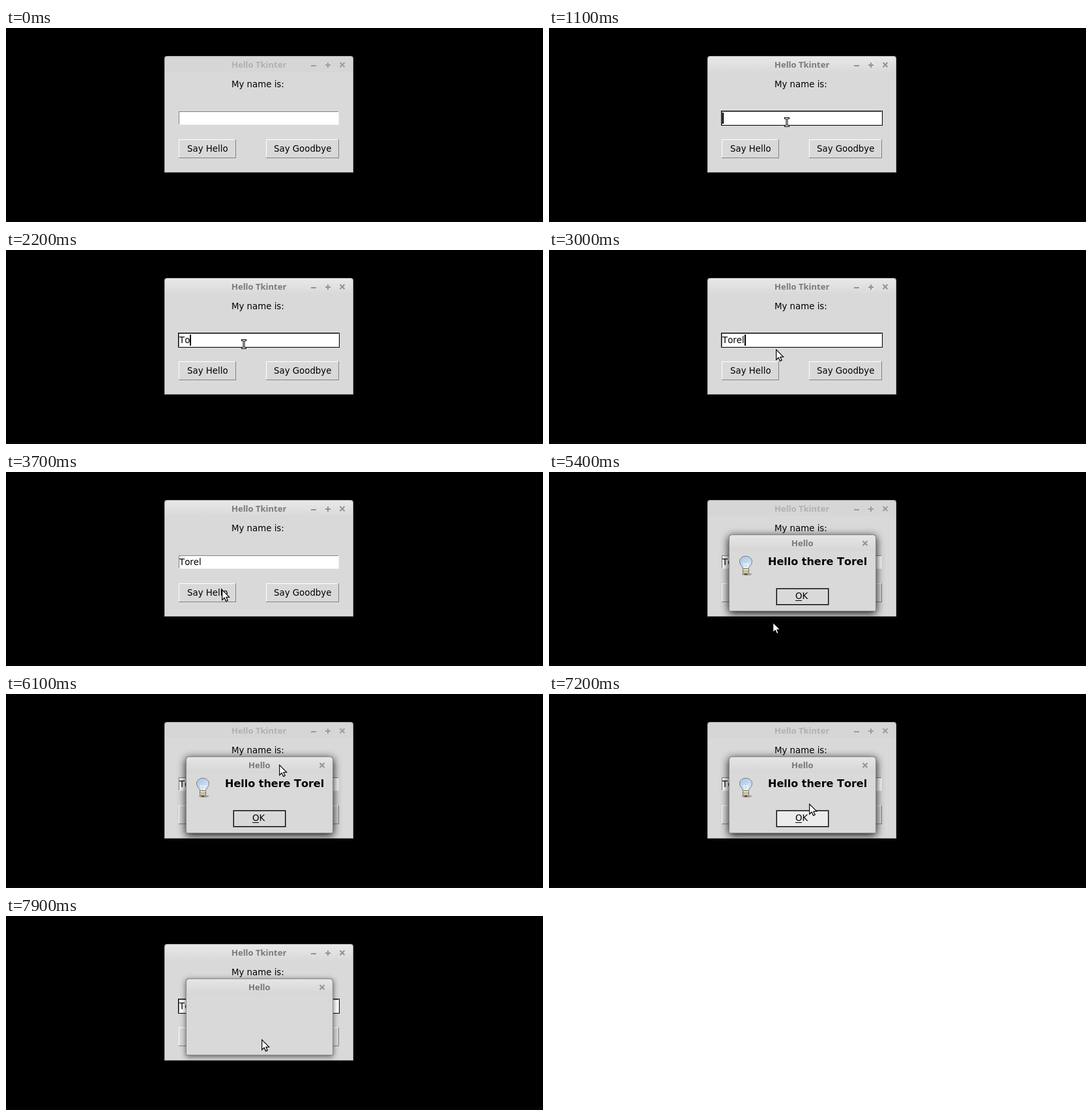
Animation of 824 by 298 pixels, one loop 8000 ms. Source, as an HTML page with a canvas:

```html
<!DOCTYPE html>
<html lang="en">
<head>
<meta charset="utf-8">
<title>Hello Tkinter</title>
<style>
  html, body { margin: 0; width: 100%; height: 100%; overflow: hidden; background: #000; }
  canvas { display: block; }
</style>
</head>
<body>
<canvas id="stage" width="824" height="298"></canvas>
<script>
const ctx = document.getElementById('stage').getContext('2d');
const LOOP = 8000, TICK = 100;
const NAME = 'Torel';
const FACE = '#d9d9d9', ACTIVE = '#ececec', DARK = '#828282', MARK = '#929292';
const UI = '13.33px "DejaVu Sans", sans-serif';
const TITLE = 'bold 13px "Open Sans", "Noto Sans", sans-serif';
const MESSAGE = 'bold 16px "DejaVu Sans", sans-serif';

// Places the pointer travels between.
const ABOVE = [366, 49], FIELD = [365, 144.5], UNDER_FIELD = [348, 152], SAY_HELLO = [331, 180];
const OFFSTAGE = [345, 390], BELOW = [343, 230], DIALOG_TITLE = [419, 108], OK = [392, 189];

const within = (t, a, b) => t >= a && t < b;

function glide(t, start, end, from, to) {
  const k = Math.min(1, Math.max(0, (t - start) / (end - start)));
  const eased = k * k * (3 - 2 * k);
  return from.map((v, i) => v + (to[i] - v) * eased);
}

function rect(x, y, w, h, color) {
  ctx.fillStyle = color;
  ctx.fillRect(x, y, w, h);
}

function frame(x, y, w, h, color, dash = []) {
  ctx.strokeStyle = color;
  ctx.lineWidth = 1;
  ctx.setLineDash(dash);
  ctx.strokeRect(x + .5, y + .5, w - 1, h - 1);
  ctx.setLineDash([]);
}

function textLeft(str, x, y, font, color = '#000') {
  ctx.font = font;
  ctx.fillStyle = color;
  ctx.fillText(str, x, y);
}

// Centred text starts on a whole pixel, as toolkit labels do.
function text(str, x, y, font, color) {
  ctx.font = font;
  textLeft(str, Math.round(x - ctx.measureText(str).width / 2), y, font, color);
}

function lines(segments, color, width) {
  ctx.beginPath();
  for (const [x1, y1, x2, y2] of segments) {
    ctx.moveTo(x1, y1);
    ctx.lineTo(x2, y2);
  }
  ctx.strokeStyle = color;
  ctx.lineWidth = width;
  ctx.stroke();
}

function bevel(x, y, w, h, topLeft, bottomRight, fill) {
  rect(x, y, w, h, bottomRight);
  rect(x, y, w - 1, h - 1, topLeft);
  rect(x + 1, y + 1, w - 2, h - 2, fill);
}

function shell(x, y, w, h, border, top, bottom) {
  const path = inset => {
    ctx.beginPath();
    ctx.roundRect(x + inset, y + inset, w - 2 * inset, h - 2 * inset, [4, 4, 0, 0]);
  };
  path(0);
  ctx.fillStyle = border;
  ctx.fill();
  ctx.shadowColor = 'transparent';
  const shade = ctx.createLinearGradient(0, y, 0, y + 25);
  shade.addColorStop(0, top);
  shade.addColorStop(1, bottom);
  path(1);
  ctx.fillStyle = shade;
  ctx.fill();
  rect(x + 1, y + 25, w - 2, h - 26, FACE);
}

function closeMark(x, y, color) {
  const r = 3.5;
  lines([[x - r, y - r, x + r, y + r], [x - r, y + r, x + r, y - r]], color, 2);
}

function button(x, w, label, hover, pressed) {
  bevel(x, 171, w, 29, pressed ? DARK : '#fff', pressed ? '#fff' : DARK, hover ? ACTIVE : FACE);
  text(label, x + w / 2 + pressed, 190 + pressed, UI);
}

// Two slow keystrokes, then a quicker run.
function typedCount(t) {
  const slow = 1 + Math.floor((t - 2000) / 200), quick = Math.floor((t - 2100) / 100);
  return Math.max(0, slow, quick);
}

function entry(t, focused) {
  if (focused) rect(264, 127, 248, 23, '#000');
  bevel(265, 128, 246, 21, DARK, '#f0f0f0', '#fff');
  const typed = NAME.slice(0, typedCount(t));
  textLeft(typed, 266, 143, UI);
  const blinkOff = within(t, 1700, 2000) || within(t, 3200, 3500);
  if (focused && !blinkOff) rect(266 + Math.round(ctx.measureText(typed).width), 130, 2, 17, '#000');
}

function mainWindow(t) {
  const active = within(t, 1000, 3800) || t >= 7900;
  const focused = within(t, 1100, 3600) || t >= 7900;
  const mark = active ? MARK : '#9c9c9c';
  shell(243, 43, 290, 179, '#b2b2b2', active ? '#e9e9e9' : '#d6d6d6', active ? FACE : '#d6d6d6');
  text('Hello Tkinter', 388.5, 61, TITLE, active ? '#7d7876' : '#b4afad');
  lines([[468, 58, 476, 58], [490, 57, 498, 57], [494, 53, 494, 61]], mark, 2);
  closeMark(516, 56.5, mark);
  text('My name is:', 386.5, 91, UI);
  entry(t, focused);
  button(265, 88, 'Say Hello', within(t, 3100, 3600), +within(t, 3500, 3600));
  button(399, 112, 'Say Goodbye', false, 0);
}

function bulb() {
  ctx.beginPath();
  ctx.ellipse(303.5, 157, 8, 2, 0, 0, Math.PI * 2);
  ctx.fillStyle = 'rgba(0,0,0,.25)';
  ctx.fill();

  const glass = ctx.createLinearGradient(294, 130, 309, 150);
  glass.addColorStop(0, '#a9c6e6');
  glass.addColorStop(.5, '#c3d8ee');
  glass.addColorStop(1, '#eef3f8');
  ctx.beginPath();
  ctx.moveTo(298, 149);
  ctx.bezierCurveTo(297.5, 145, 292.5, 143, 292.5, 138);
  ctx.bezierCurveTo(292.5, 126.5, 311.5, 126.5, 311.5, 138);
  ctx.bezierCurveTo(311.5, 143, 306.5, 145, 306, 149);
  ctx.closePath();
  ctx.fillStyle = glass;
  ctx.fill();
  ctx.strokeStyle = '#747b83';
  ctx.lineWidth = 1;
  ctx.stroke();
  lines([[300.5, 148, 298.5, 140], [303.5, 148, 305.5, 140], [298.5, 140, 302, 142], [302, 142, 305.5, 140]], '#f8faf5', 1);

  ctx.beginPath();
  ctx.roundRect(297.5, 148.5, 9, 9, [1, 1, 4, 4]);
  ctx.fillStyle = '#f0e9bd';
  ctx.fill();
  ctx.strokeStyle = '#6b6757';
  ctx.stroke();
  for (let y = 151; y < 156; y += 2) rect(298, y, 8, 1, '#a59c72');
  rect(300, 156, 4, 2, '#4d4a40');
}

function okButton(hover, pressed) {
  rect(348, 178, 82, 27, hover ? ACTIVE : FACE);
  frame(348, 178, 82, 27, '#fff');
  frame(348, 178, 82, 27, '#000', [1, 1]);
  frame(349, 179, 80, 25, '#000');
  text('OK', 388 + pressed, 195 + pressed, UI);
  rect(378 + pressed, 197 + pressed, 10, 1, '#000');
}

function dialog(t) {
  const filled = within(t, 3900, 7900);
  ctx.save();
  ctx.beginPath();
  ctx.rect(243, 43, 290, 179);
  ctx.clip();
  ctx.shadowColor = filled ? 'rgba(0,0,0,.95)' : 'rgba(0,0,0,.6)';
  ctx.shadowBlur = filled ? 13 : 8;
  ctx.shadowOffsetY = filled ? 3 : 2;
  shell(276, 96, 226, 118, '#8a8a8a', '#e6e6e6', '#d6d6d6');
  ctx.restore();
  text('Hello', 389, 114, TITLE, '#737878');
  closeMark(485, 109.5, MARK);
  if (!filled) return;
  bulb();
  textLeft('Hello there ' + NAME, 336, 143, MESSAGE);
  okButton(t >= 7200, +(t >= 7800));
}

function arrow([x, y]) {
  const outline = [[.7, 1.2], [.7, 16.5], [4.2, 13.2], [6.6, 18.6], [9.2, 17.5], [6.9, 12.3], [11.6, 12.1]];
  ctx.beginPath();
  for (const [dx, dy] of outline) ctx.lineTo(x + dx, y + dy);
  ctx.closePath();
  ctx.fillStyle = '#fff';
  ctx.fill();
  ctx.strokeStyle = '#000';
  ctx.lineWidth = 1.2;
  ctx.stroke();
}

function beam([x, y]) {
  const layer = (color, grow) => {
    for (const end of [-6, 6]) rect(x - 3 - grow, y + end - .5 - grow, 6 + 2 * grow, 1 + 2 * grow, color);
    rect(x - .5 - grow, y - 6, 1 + 2 * grow, 12, color);
  };
  layer('#000', 1);
  layer('#fff', 0);
}

function pointer(t) {
  if (t < 300 || within(t, 4000, 5400)) return;
  if (t < 600) arrow(glide(t, 300, 600, ABOVE, [359, 143]));
  else if (t < 3000) beam(glide(t, 700, 800, [363, 150.5], FIELD));
  else if (t < 3800) arrow(glide(t, 3000, 3300, UNDER_FIELD, SAY_HELLO));
  else if (t < 4000) arrow(glide(t, 3800, 4000, SAY_HELLO, OFFSTAGE));
  else if (t < 6800) arrow(glide(t, 5400, 6100, BELOW, DIALOG_TITLE));
  else arrow(glide(t, 6800, 7400, DIALOG_TITLE, OK));
}

function draw(t) {
  rect(0, 0, 824, 298, '#000');
  rect(0, 294, 824, 4, '#080204');
  mainWindow(t);
  if (t >= 3800) dialog(t);
  pointer(t);
}

ctx.fontKerning = 'none';
const start = performance.now();
function step() {
  const t = (performance.now() - start) % LOOP;
  draw(Math.floor(t / TICK) * TICK);
  requestAnimationFrame(step);
}
step();
</script>
</body>
</html>
```
